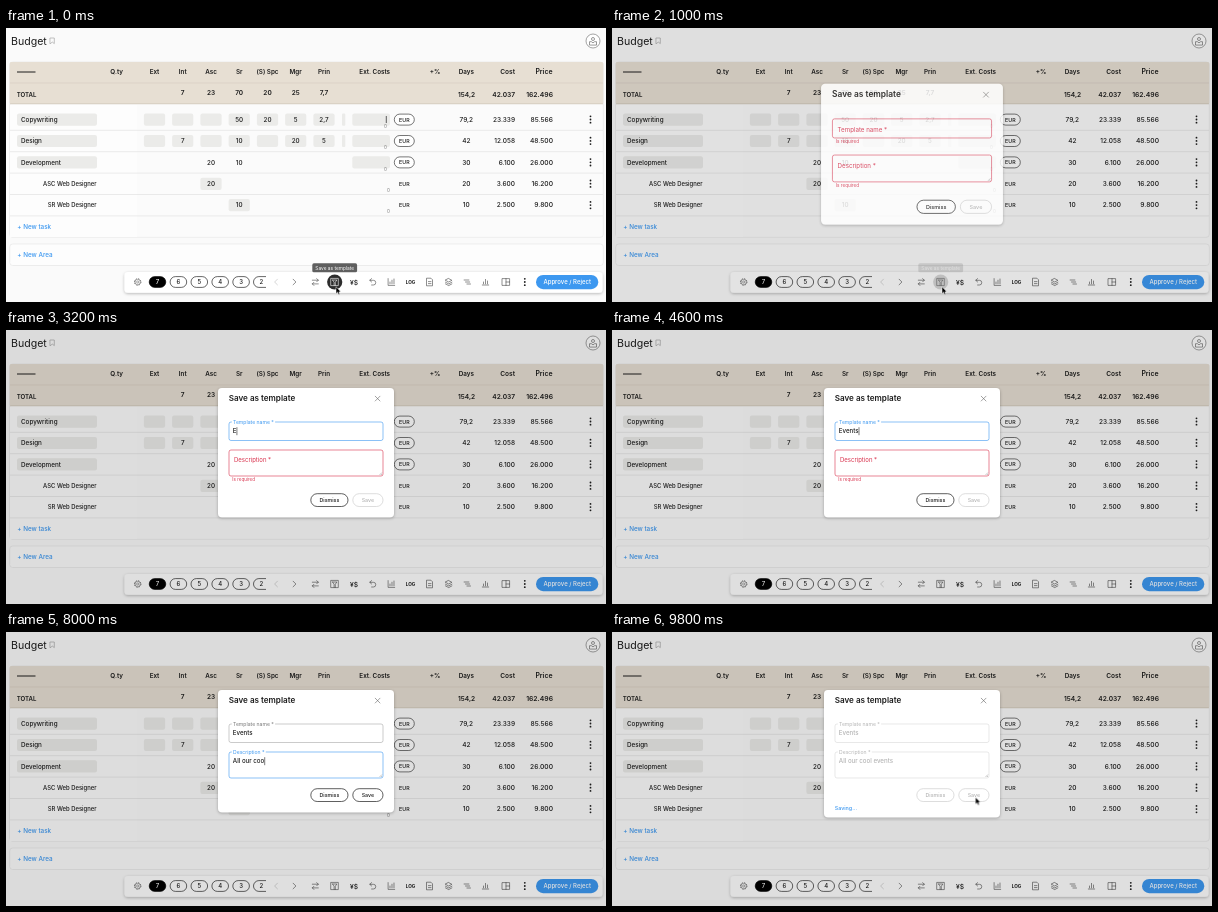
Recreate the animation shown at these times as an HTML page. Size 600 by 274 pixels, loop 9.9 s.

```html
<!DOCTYPE html>
<html lang="en">
<head>
<meta charset="utf-8">
<title>Budget</title>
<style>
html, body { margin: 0; width: 100%; height: 100%; overflow: hidden; background: #fafafa; }
svg { display: block; width: 100vw; height: 100vh; }
text { font-family: Inter, Roboto, sans-serif; white-space: pre; }
.icon { fill: none; stroke: #444; stroke-width: .6; stroke-linecap: round; stroke-linejoin: round; }
#hover, #tip, #veil, #dialog, #cursor, #pointer { animation: 9.9s linear infinite; }
#hover, #tip { animation-name: unhover; }
#veil { animation-name: veil; }
#dialog { animation-name: dialog; transform-origin: 300px 126px; }
#cursor { animation-name: move; animation-timing-function: ease-in-out; }
#pointer { animation-name: show; animation-timing-function: step-end; }
@keyframes unhover { 0%, 8.4% { opacity: 1 } 10.5%, 100% { opacity: 0 } }
@keyframes veil { 0%, 8.08% { opacity: 0 } 10.4%, 100% { opacity: 1 } }
@keyframes dialog {
  0%, 8.08% { opacity: 0; transform: scale(1.22); animation-timing-function: ease-out }
  11.1%, 100% { opacity: 1; transform: scale(1) }
}
@keyframes move {
  0%, 12.1% { transform: translate(330px, 258.7px) }
  20.2%, 50.5% { transform: translate(260.8px, 105.3px) }
  56%, 90.4% { transform: translate(285px, 131px) }
  94.4%, 100% { transform: translate(363.5px, 165.3px) }
}
@keyframes show {
  0% { opacity: 1 } 32.3% { opacity: 0 } 50.5% { opacity: 1 }
  61.1% { opacity: 0 } 90.4%, 100% { opacity: 1 }
}
</style>
</head>
<body>
<svg viewBox="0 0 600 274">
  <defs>
    <filter id="shadow" x="-20%" y="-50%" width="140%" height="200%">
      <feDropShadow dx="0" dy="1" stdDeviation="1.6" flood-opacity=".28"/>
    </filter>
  </defs>
  <g id="page"></g>
  <g id="bar"></g>
  <rect id="veil" width="600" height="274" fill="#000" fill-opacity=".125"/>
  <g id="dialog"></g>
  <g id="cursor"><path id="pointer" d="M0 0V6.9L1.6 5.5L2.6 7.8L3.9 7.2L2.9 5H5Z" fill="#000" stroke="#fff" stroke-width=".5"/></g>
</svg>
<script>
const INK = '#1c1c1c', BLUE = '#3d98f0', RED = '#d9344f', FAINT = '#b4b4b4';
const $ = id => document.getElementById(id);
const pen = document.createElement('canvas').getContext('2d');

const widthOf = (s, size, weight = 400) => {
  pen.font = `${weight} ${size * 10}px Inter, Roboto, sans-serif`;
  return pen.measureText(s).width / 10;
};
const text = (s, x, y, size = 6.4, o = {}) =>
  `<text x="${x}" y="${y}" font-size="${size}" font-weight="${o.w || 400}" fill="${o.c || INK}" text-anchor="${o.a || 'start'}">${s}</text>`;
const mid = (s, x, y, size, o) => text(s, x, y, size, { ...o, a: 'middle' });
const end = (s, x, y, size, o) => text(s, x, y, size, { ...o, a: 'end' });
const box = (x, y, w, h, r, fill, stroke = 'none', sw = .6) =>
  `<rect x="${x}" y="${y}" width="${w}" height="${h}" rx="${r}" fill="${fill}" stroke="${stroke}" stroke-width="${sw}"/>`;
const rule = (y, c = '#e2e2e2') => `<path d="M4 ${y}H597" stroke="${c}" stroke-width=".7"/>`;
const icon = (x, y, d, c = '#444') => `<path class="icon" transform="translate(${x} ${y})" d="${d}" style="stroke:${c}"/>`;
const dots = (x, y) => [-3.2, 0, 3.2].map(d => `<circle cx="${x}" cy="${y + d}" r=".9" fill="${INK}"/>`).join('');

const COLS = [148.5, 176.7, 205, 233.2, 261.5, 289.7, 318];

function drawPage() {
  const bold = { w: 600 }, medium = { w: 450 };
  let s = text('Budget', 5, 16.6, 10.6);
  s += icon(46.3, 12.8, 'M-2 -2.8H2V2.8L0 1.3L-2 2.8Z', '#999');
  s += `<circle cx="587" cy="13" r="7" fill="#fff" stroke="#666" stroke-width=".6"/>`;
  s += `<circle cx="587" cy="11" r="1.5" fill="none" stroke="#555" stroke-width=".6"/>`;
  s += icon(587, 14.5, 'M-3.5 2.2V-.8H-1.6L0 .4L1.6 -.8H3.5V2.2Z', '#555');

  s += box(3.7, 34, 593.6, 175.3, 3, '#fbfbfb', '#e2e2e2');
  s += box(4, 77, 127, 132, 0, '#fdfdfd');
  s += box(3.7, 34, 593.6, 42, 1.5, '#e7dfd3') + rule(55, '#d6cdc0') + rule(75.8, '#cdc4b7');
  s += `<path d="M11 44H29.5" stroke="${INK}" stroke-width="1"/>`;
  ['Ext', 'Int', 'Asc', 'Sr', '(S) Spc', 'Mgr', 'Prin'].forEach((h, i) => s += mid(h, COLS[i], 46.3, 6.3, bold));
  s += mid('Q.ty', 110.7, 46.3, 6.3, bold) + mid('Ext. Costs', 368.7, 46.3, 6.3, bold) + mid('+%', 429, 46.3, 6.3, bold);
  s += mid('Days', 460.3, 46.3, 6.3, bold) + end('Cost', 509, 46.3, 6.6, bold) + end('Price', 546.5, 46.3, 6.9, bold);
  s += text('TOTAL', 10.7, 69, 6.1, bold);
  ['', 7, 23, 70, 20, 25, '7,7'].forEach((v, i) => s += mid(v, COLS[i], 66.8, 6.5, bold));
  s += mid('154,2', 460.6, 68.6, 6.6, bold) + end('42.037', 509, 68.6, 6.6, bold) + end('162.496', 547, 68.6, 6.8, bold);

  const rows = [
    ['Copywriting', ['', '', '', 50, 20, 5, '2,7'], '79,2', '23.339', '85.566'],
    ['Design', ['', 7, '', 10, '', 20, 5], '42', '12.058', '48.500'],
    ['Development', [, , 20, 10], '30', '6.100', '26.000'],
    ['ASC Web Designer', [, , 20], '20', '3.600', '16.200'],
    ['SR Web Designer', [, , , 10], '10', '2.500', '9.800']
  ];
  rows.forEach(([name, cells, days, cost, price], i) => {
    const y = 91.5 + i * 21.4, base = y + 2.3, area = i < 3;
    if (area) {
      s += box(11, y - 6, 80, 12.2, 2, '#ebebe9') + text(name, 15, base, 6.3, medium);
      s += box(346.3, y - 6, 37.7, 12.2, 2, '#ebebe9') + box(388.3, y - 5.4, 20, 11, 5.5, '#fff', INK);
    } else s += end(name, 90.5, base, 5.9, medium);
    cells.forEach((v, k) => {
      if (i !== 2) s += box(COLS[k] - 10.6, y - 6, 21.2, 12.2, 2, '#ebebe9');
      s += mid(v, COLS[k], base, 6.3, { w: 500 });
    });
    if (i < 2) s += box(336, y - 6, 3.3, 12.2, 1, '#ebebe9');
    s += mid('0', area ? 379.5 : 382.5, y + 8.3, 4.6, { c: '#777' });
    s += mid('EUR', 398.3, y + 2, 5.3, medium);
    s += mid(days, 460.3, base, 6.5, medium) + end(cost, 509, base, 6.5, medium) + end(price, 547, base, 6.7, medium);
    s += dots(584.5, y) + rule(y + 10.8);
  });
  s += '<path id="cellCaret" d="M380.3 88V95" stroke="#222" stroke-width=".7"/>';
  s += text('+ New task', 11.3, 200.8, 6.3, { c: BLUE, w: 500 });
  s += box(3.7, 216, 593.6, 21.5, 3, '#fdfdfd', '#e2e2e2') + text('+ New Area', 11.3, 229.2, 6.3, { c: BLUE, w: 500 });
  $('page').innerHTML = s;
}

function drawBar() {
  let s = `<g filter="url(#shadow)">${box(118.5, 244, 478, 20.7, 3.5, '#fff')}</g>`;
  const y = 254;
  s += `<circle cx="131.7" cy="${y}" r="3.2" fill="none" stroke="#555" stroke-width=".9" stroke-dasharray="1.4 1.11"/>`;
  s += `<circle cx="131.7" cy="${y}" r="2.7" fill="#fff" stroke="#555" stroke-width=".5"/><circle cx="131.7" cy="${y}" r="1.1" fill="none" stroke="#555" stroke-width=".5"/>`;
  for (let i = 0; i < 5; i++) {
    const x = 143.2 + i * 20.9;
    s += box(x, 248.6, 16.6, 10.8, 5.4, i ? '#fff' : '#000', '#000') + mid(7 - i, x + 8.3, 256.2, 6, { w: 500, c: i ? INK : '#fff' });
  }
  s += `<path d="M260 248.6H252.9A5.4 5.4 0 0 0 252.9 259.4H260" fill="none" stroke="#000" stroke-width=".6"/>` + mid('2', 255.4, 256.2, 6, { w: 500 });
  s += icon(270, y, 'M1.4 -2.8L-1.4 0L1.4 2.8', '#bbb') + icon(288.5, y, 'M-1.4 -2.8L1.4 0L-1.4 2.8');
  s += icon(309.3, y, 'M-3 -1.8H3M1.4 -3.4L3 -1.8L1.4 -.2M3 1.9H-3M-1.4 .3L-3 1.9L-1.4 3.5');
  const saveIcon = 'M-3.6 -3.6H3.6V3.6H-3.6ZM-2.2 -2H2.2L.6 .2V3.4M-2.2 -2L-.6 .2V3.4';
  s += icon(328.7, y, saveIcon);
  s += `<g id="hover"><circle cx="328.7" cy="${y}" r="7.6" fill="#2d2d2d"/>${icon(328.7, y, saveIcon, '#fff')}</g>`;
  s += mid('¥$', 348, 256.5, 6.7, { w: 500 });
  s += icon(366.8, y, 'M-1.2 -3.4L-3 -1.7L-1.2 0M-3 -1.7H.6A2.3 2.3 0 0 1 .6 3H-1.2');
  s += icon(385.3, y, 'M-3.2 -3.4V3.4H3.4M-1.3 1.8V0M.7 1.8V-1.8M2.7 1.8V-3');
  s += mid('LOG', 404.5, 255.9, 4.7, { w: 700 });
  s += icon(423.7, y, 'M-2.8 -3.8H1.2L2.8 -2.2V3.8H-2.8ZM-1.3 -.4H1.3M-1.3 1.6H1.3');
  s += icon(442.7, y, 'M0 -3.4L3.2 -1.7L0 0L-3.2 -1.7ZM-3.2 .2L0 1.9L3.2 .2M-3.2 1.9L0 3.6L3.2 1.9');
  s += icon(461.3, y, 'M-3.2 -2H1.6M-1.8 0H2.4M-.4 2H3.2');
  s += icon(479.5, y, 'M-3.2 3H3.2M-2 1.8V0M0 1.8V-2.6M2 1.8V-1');
  s += icon(500, y, 'M-3.6 -3.4H3.6V3.4H-3.6ZM0 -3.4V3.4M0 0H3.6');
  s += dots(518.8, y);
  s += box(530, 247, 62.3, 14.2, 7.1, BLUE) + mid('Approve / Reject', 561.2, 256.2, 6, { w: 500, c: '#fff' });
  s += `<g id="tip">${box(306.3, 235.3, 44.8, 9, 1.6, '#5f5f5f')}${mid('Save as template', 328.7, 241.5, 4.8, { c: '#fff' })}</g>`;
  $('bar').innerHTML = s;
}

// Typing bursts: start, time per key, characters
const NAME_KEYS = [[3200, 220, 'Events']];
const ABOUT_KEYS = [[6050, 200, 'All'], [6850, 150, ' our cool'], [8400, 90, ' events']];
const FOCUS_NAME = 2100, FOCUS_ABOUT = 5600, SAVE = 9420;

function typed(keys, t) {
  let value = '', last = 0;
  for (const [start, step, chars] of keys) {
    const n = Math.min(chars.length, Math.max(0, Math.floor((t - start) / step) + 1));
    value += chars.slice(0, n);
    if (n) last = start + (n - 1) * step;
  }
  return { value, last };
}

function field({ y, h, label, value, last, focusAt, focused, t, saving, area }) {
  const error = !value;
  const p = Math.max(0, Math.min(1, (t - focusAt) / 150));
  const c = saving ? FAINT : error ? RED : focused ? BLUE : '#777';
  const edge = saving ? '#d9d9d9' : error || focused ? c : '#a8a8a8';
  const size = 6 - .9 * p, base = y + 12.3 - 10.4 * p;
  let s = box(223, y, 154, h, 2, '#fff', edge, .6);
  if (p > .7) s += box(225.8, y - 1, widthOf(label, size) + 2.4, 2, 0, '#fff');
  s += text(label, 228 - p, base, size, { c });
  s += text(value, 226.8, y + 11.4, 6.15, { c: saving ? FAINT : INK, w: 500 });
  if (area) s += `<path d="M373.5 ${y + h - 1}L376 ${y + h - 3.5}M375 ${y + h - 1}L376 ${y + h - 2}" stroke="#777" stroke-width=".4"/>`;
  if (error) s += text('Is required', 226.3, y + h + 5, 4.5, { c: RED });
  const since = t - Math.max(last, focusAt);
  if (focused && since % 1000 < 550) {
    const x = 227.2 + widthOf(value, 6.15, 500);
    s += `<path d="M${x} ${y + 5.2}V${y + 13.2}" stroke="#222" stroke-width=".6"/>`;
  }
  return s;
}

function dialogMarkup(t) {
  const saving = t >= SAVE;
  const name = typed(NAME_KEYS, t), about = typed(ABOUT_KEYS, t);
  const y2 = name.value ? 120 : 127;
  const by = y2 + (about.value ? 43 : 50);
  const ready = name.value && about.value && !saving;
  const bottom = by + (saving ? 22.3 : 17.2);
  let s = `<g filter="url(#shadow)">${box(212, 58, 176, bottom - 58, 4, '#fff')}</g>`;
  s += text('Save as template', 222.7, 71.3, 8.1, { w: 600 });
  s += icon(371.6, 68.6, 'M-2.4 -2.4L2.4 2.4M2.4 -2.4L-2.4 2.4', '#666');
  s += field({ ...name, y: 92, h: 18.5, label: 'Template name *', focusAt: FOCUS_NAME, focused: t >= FOCUS_NAME && t < FOCUS_ABOUT, t, saving });
  s += field({ ...about, y: y2, h: 26, label: 'Description *', focusAt: FOCUS_ABOUT, focused: t >= FOCUS_ABOUT && !saving, t, saving, area: true });
  const button = (label, x, w, on) =>
    box(x, by - 6.3, w, 12.8, 6.4, '#fff', on ? INK : '#cfcfcf', .7) + mid(label, x + w / 2, by + 2, 5.3, { w: 500, c: on ? INK : FAINT });
  s += button('Dismiss', 304.8, 37.2, !saving) + button('Save', 346.8, 30.2, ready);
  if (saving) s += text('Saving...', 222.7, by + 14.6, 5.4, { c: BLUE, w: 500 });
  return s;
}

drawPage();
drawBar();
const start = performance.now();
let shown = '';
function frame() {
  const t = (performance.now() - start) % 9900;
  const markup = dialogMarkup(t);
  if (markup !== shown) $('dialog').innerHTML = shown = markup;
  $('cellCaret').style.opacity = t < 500 ? 1 : 0;
  requestAnimationFrame(frame);
}
frame();
</script>
</body>
</html>
```
